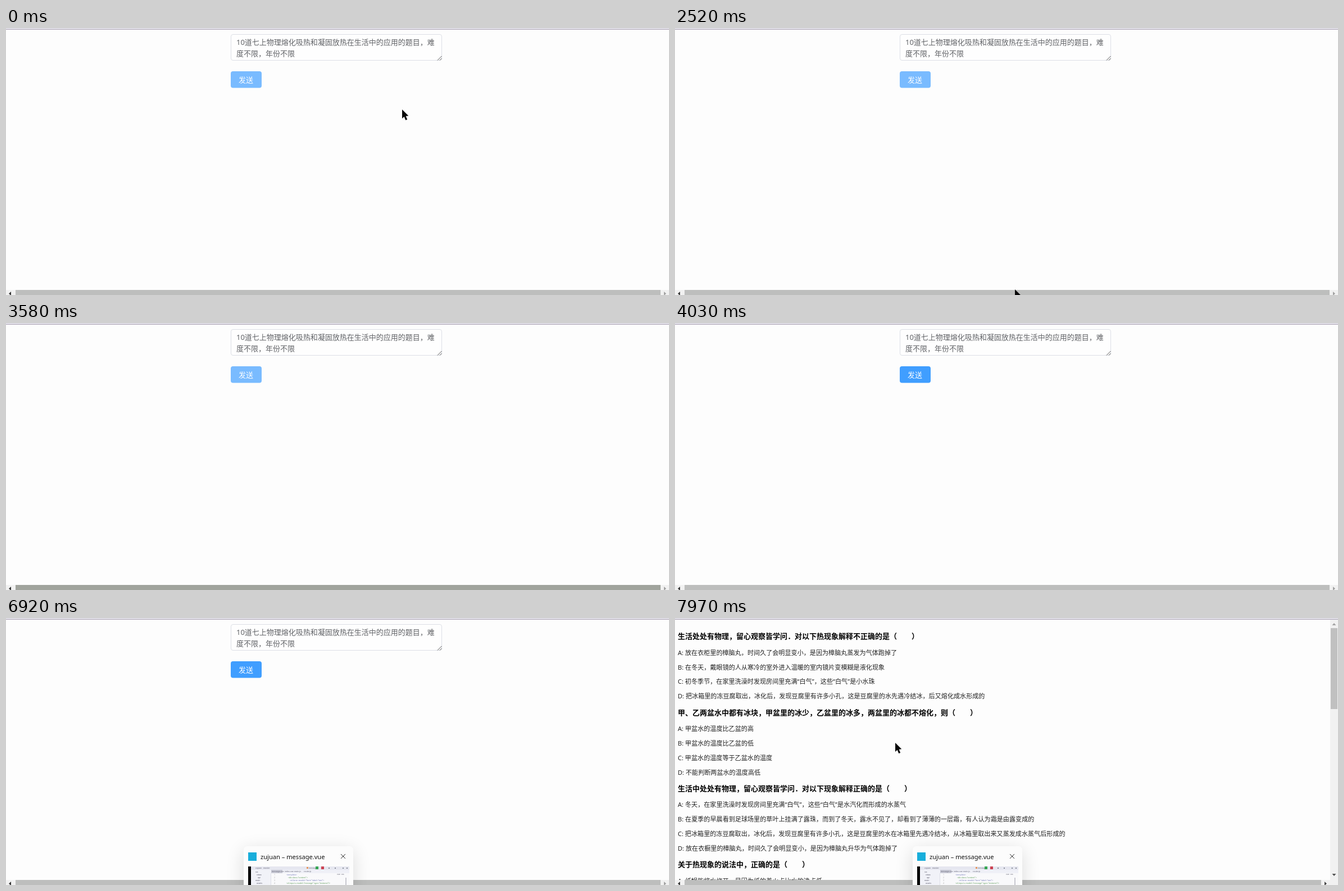
An HTML page with a canvas that plays this animation: 1180x475 px, repeating every 8000 ms.

```html
<!DOCTYPE html>
<html lang="zh-CN">
<head>
<meta charset="utf-8">
<style>
html, body { margin: 0; width: 100%; height: 100%; overflow: hidden; background: #fdfdfd; }
canvas { display: block; }
</style>
</head>
<body>
<canvas id="stage" width="1180" height="475"></canvas>
<script>
const ctx = document.getElementById('stage').getContext('2d');
const W = 1180, H = 475, LOOP = 8000;
const SANS = '"Noto Sans", "Noto Sans CJK SC", sans-serif';
const CJK = '"Noto Sans CJK SC", "Noto Sans CJK", sans-serif';

const POPUP_AT = 5940, CLOSE_AT = 6790, ANSWER_AT = 7320;

const QUESTIONS = [
  ['生活处处有物理，留心观察皆学问．对以下热现象解释不正确的是（　　）',
   'A: 放在衣柜里的樟脑丸，时间久了会明显变小，是因为樟脑丸蒸发为气体跑掉了',
   'B: 在冬天，戴眼镜的人从寒冷的室外进入温暖的室内镜片变模糊是液化现象',
   'C: 初冬季节，在家里洗澡时发现房间里充满“白气”，这些“白气”是小水珠',
   'D: 把冰箱里的冻豆腐取出，冰化后，发现豆腐里有许多小孔，这是豆腐里的水先遇冷结冰，后又熔化成水形成的'],
  ['甲、乙两盆水中都有冰块，甲盆里的冰少，乙盆里的冰多，两盆里的冰都不熔化，则（　　）',
   'A: 甲盆水的温度比乙盆的高',
   'B: 甲盆水的温度比乙盆的低',
   'C: 甲盆水的温度等于乙盆水的温度',
   'D: 不能判断两盆水的温度高低'],
  ['生活中处处有物理，留心观察皆学问．对以下现象解释正确的是（　　）',
   'A: 冬天，在家里洗澡时发现房间里充满“白气”，这些“白气”是水汽化而形成的水蒸气',
   'B: 在夏季的早晨看到足球场里的草叶上挂满了露珠，而到了冬天，露水不见了，却看到了薄薄的一层霜，有人认为霜是由露变成的',
   'C: 把冰箱里的冻豆腐取出，冰化后，发现豆腐里有许多小孔，这是豆腐里的水在冰箱里先遇冷结冰，从冰箱里取出来又蒸发成水蒸气后形成的',
   'D: 放在衣橱里的樟脑丸，时间久了会明显变小，是因为樟脑丸升华为气体跑掉了'],
  ['关于热现象的说法中，正确的是（　　）',
   'A: 纸锅能将水烧开，是因为纸的着火点比水的沸点低']
];

// start, end, from, to, easing
const smooth = u => u * u * (3 - 2 * u);
const MOVES = [
  [850, 1420, [705, 145], [743, 270], smooth],
  [1630, 1710, [743, 270], [745, 261], smooth],
  [2030, 2520, [745, 261], [605, 465], u => Math.pow(u, 1.3)],
  [7770, 7970, [432, 475], [392, 222], u => 1 - (1 - u) * (1 - u)]
];

const ramp = (t, a, b) => Math.min(1, Math.max(0, (t - a) / (b - a)));
const mix = (a, b, u) => a.map((v, i) => v + (b[i] - v) * u);
const rgb = c => `rgb(${c.map(Math.round).join(',')})`;

function rect(x, y, w, h, color) {
  ctx.fillStyle = color;
  ctx.fillRect(x, y, w, h);
}

function rounded(x, y, w, h, r, fill, stroke) {
  ctx.beginPath();
  ctx.roundRect(x, y, w, h, r);
  ctx.fillStyle = fill;
  ctx.fill();
  if (stroke) {
    ctx.strokeStyle = stroke;
    ctx.stroke();
  }
}

function text(str, x, y, font, color) {
  ctx.font = font;
  ctx.fillStyle = color;
  ctx.fillText(str, x, y);
}

function polygon(points, color) {
  ctx.beginPath();
  points.forEach(p => ctx.lineTo(...p));
  ctx.closePath();
  ctx.fillStyle = color;
  ctx.fill();
}

function lines(segments, color) {
  ctx.beginPath();
  for (const [x1, y1, x2, y2] of segments) {
    ctx.moveTo(x1, y1);
    ctx.lineTo(x2, y2);
  }
  ctx.strokeStyle = color;
  ctx.stroke();
}

function arrowhead(x, y, dx, dy, color) {
  polygon([[x + 2 * dx, y + 2 * dy],
           [x - 2 * dx + 3.5 * dy, y - 2 * dy + 3.5 * dx],
           [x - 2 * dx - 3.5 * dy, y - 2 * dy - 3.5 * dx]], color);
}

function drawForm(t) {
  rounded(400.5, 11.5, 375, 46, 3.5, '#fefefe', '#dcdfe6');
  const font = '13px ' + SANS;
  text('10道七上物理熔化吸热和凝固放热在生活中的应用的题目，难', 410, 30, font, '#606266');
  text('度不限，年份不限', 410, 50, font, '#606266');
  lines([[768, 57.5, 775.5, 50], [772, 57.5, 775.5, 54]], '#555');

  const blue = mix([121, 187, 255], [64, 158, 255], ramp(t, 3900, 4020));
  rounded(400, 77, 55, 29.5, 4, rgb(blue));
  text('发送', 414, 97, '13px ' + CJK, '#fff');
}

function drawQuestions() {
  QUESTIONS.forEach(([title, ...options], i) => {
    const y = 32.5 + i * 135.4;
    text(title, 5, Math.round(y + 4.6), 'bold 13px ' + CJK, '#000');
    options.forEach((option, k) =>
      text(option, 5, Math.round(y + 33.1 + k * 25.9), '11.1px ' + SANS, '#222'));
  });
  rect(1166, 3, 14, 463, '#f1f1f1');
  rect(1167, 18, 12, 144, '#c0c0c0');
  arrowhead(1173, 11, 0, -1, '#a3a3a3');
  arrowhead(1173, 457, 0, 1, '#505050');
}

function drawBottomBar(t, answered) {
  const hover = Math.max(
    Math.min(ramp(t, 2540, 2600), 1 - ramp(t, 2640, 2730)),
    Math.min(ramp(t, 3380, 3540), 1 - ramp(t, 3720, 3880)));
  const end = answered ? 1150 : 1165;
  rect(0, 466, W, 9, '#f1f1f1');
  rect(17, 466, end - 17, 9, rgb(mix([189, 190, 189], [161, 164, 157], hover)));
  arrowhead(7, 472.5, -1, 0, '#333');
  arrowhead(end + 8, 472.5, 1, 0, answered ? '#444' : '#a0a0a0');
}

function drawThumbnail() {
  rect(431, 442, 180, 33, '#f9f9fb');
  rect(436, 442, 175, 6, '#e6e7f0');
  rect(436, 448, 35, 27, '#f1f2f8');
  rect(471, 448, 140, 6, '#eff0f7');
  rect(472, 448, 20, 6, '#c9cad6');
  rect(471, 454, 1, 21, '#dfe0e8');
  rect(604, 462, 2, 13, '#c9c9d0');
  rect(431, 442, 5, 33, '#000');

  const tiny = '3.5px ' + SANS;
  const put = (str, x, y, color = '#667') => text(str, x, y, tiny, color);
  put('zujuan', 444, 446);
  put('master', 458, 446);
  put('message', 539, 446);
  put('message.vue', 473, 452);
  ['index.vue', 'main.js', 'router.js'].forEach((name, i) => put(name, 496 + i * 17, 452));
  put('vue  css', 589, 457);
  ['src', 'views', 'api', 'main', 'assets'].forEach((name, i) =>
    put(name, 444 + i % 3 * 2, 453 + i * 5, '#556'));
  ['<template>', '<div class="content">', '<el-form :model="form" label="text">',
   '<el-input v-model="message" type="textarea"/>', '<el-button @click="send">'].forEach((code, i) => {
    put(String(i + 1), 477, 458 + i * 5, '#aaa');
    put(code, 499 + i % 3 * 3, 458 + i * 5, i % 2 ? '#5a9a55' : '#7178b8');
  });
  rect(535, 443, 3, 3, '#e8955b');
  rect(551, 442, 5, 5, '#35a653');
  rect(561, 442, 5, 5, '#cb4252');
  [574, 585, 599, 606].forEach(x => rect(x, 444, 2, 2, '#888d99'));
}

function drawPopup(t) {
  ctx.save();
  ctx.shadowColor = `rgba(0,0,0,${0.08 + 0.06 * ramp(t, POPUP_AT, 6060)})`;
  ctx.shadowBlur = 32;
  ctx.shadowOffsetY = 8;
  rounded(423, 406, 195, 90, 6, '#fcfcfc');
  ctx.restore();
  rect(431, 417, 15, 15, '#18aedb');
  text('zujuan – message.vue', 453, 429, '11.1px ' + SANS, '#111');
  if (t >= CLOSE_AT) lines([[596, 420, 604, 428], [604, 420, 596, 428]], '#333');
  drawThumbnail();
}

function drawPointer(t) {
  if (t >= 2555 && t < 7805) return;
  let pos = MOVES[0][2];
  for (const [start, end, from, to, ease] of MOVES)
    if (t >= start) pos = mix(from, to, ease(ramp(t, start, end)));
  ctx.save();
  ctx.translate(Math.round(pos[0]), Math.round(pos[1]));
  polygon([[0, 0], [0, 16], [3.6, 12.7], [6.3, 19], [9.2, 17.8], [6.6, 11.7], [11.3, 11.3]], '#080808');
  ctx.restore();
}

function draw(t) {
  const answered = t >= ANSWER_AT;
  rect(0, 0, W, H, '#fdfdfd');
  if (answered) drawQuestions();
  else drawForm(t);
  rect(0, 0, W, 2, '#e2e0e8');
  rect(0, 2, W, 1, '#aaa3b5');
  drawBottomBar(t, answered);
  if (t >= POPUP_AT) drawPopup(t);
  drawPointer(t);
}

function tick() {
  draw(performance.now() % LOOP);
  requestAnimationFrame(tick);
}
tick();
</script>
</body>
</html>
```
